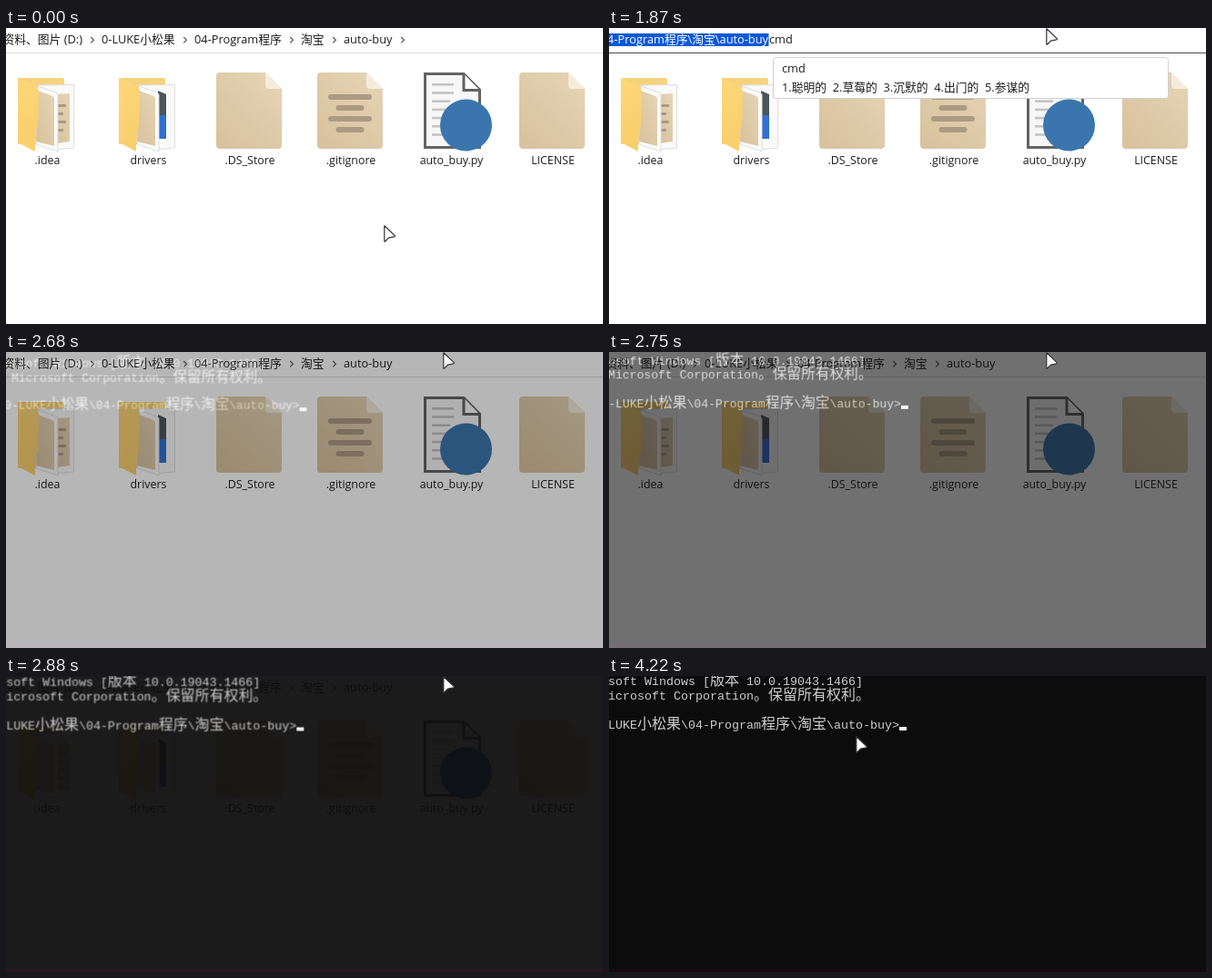
Animation, 656 px wide and 326 px high, one loop 4.75 s. Source, as an HTML page:

```html
<!DOCTYPE html>
<html lang="zh">
<head>
<meta charset="utf-8">
<title>Open a terminal from the address bar</title>
<style>
html, body { margin: 0; width: 100%; height: 100%; overflow: hidden; background: #fff; }
svg { display: block; width: 656px; height: 326px; }
text { font: 12.4px "Open Sans", "Noto Sans CJK SC", "Noto Sans CJK", sans-serif; fill: #1d1d1d; white-space: pre; }
.bar text { font-size: 12.8px; }
#path text { fill: #fff; }
#term text { font: 13.33px "Liberation Mono", "Noto Sans CJK SC", "Noto Sans CJK", monospace; fill: #ccc; }
#term .wide { font: 16px "Noto Sans CJK SC", "Noto Sans CJK", sans-serif; }
#term { transform-origin: 421px 205px; }
</style>
</head>
<body>
<svg viewBox="0 0 656 326">
  <defs>
    <linearGradient id="sand" x1="1" y1="0" x2="0.2" y2="1">
      <stop offset="0" stop-color="#e6d5b5"/><stop offset="1" stop-color="#d9c29f"/>
    </linearGradient>
    <linearGradient id="gold" x1="0" y1="0" x2="0.3" y2="1">
      <stop offset="0" stop-color="#ffd779"/><stop offset="1" stop-color="#f9cf6c"/>
    </linearGradient>
  </defs>
  <rect width="656" height="326" fill="#fff"/>
  <g id="files"></g>
  <rect y="27" width="656" height="1" fill="#d9d9d9"/>
  <rect id="focus" y="27" width="656" height="1" fill="#4b4b4b"/>
  <g id="crumbs" class="bar"></g>
  <g id="lastChevron"></g>
  <g id="path" class="bar">
    <rect y="6" width="175.5" height="14" fill="#0a58d6"/>
    <text x="175" y="17" text-anchor="end">04-Program程序\淘宝\auto-buy</text>
  </g>
  <g id="ime" class="bar"></g>
  <g id="term">
    <rect x="-100" y="-100" width="900" height="500" fill="#0c0c0c"/>
    <rect x="-100" y="323" width="900" height="80" fill="#1a0713"/>
    <rect id="caret" x="319" y="56" width="8" height="4" fill="#f2f2f2"/>
  </g>
  <path id="cursor" d="M.8.8V17.6Q.9 18.6 1.7 18L5.4 14.2 11.8 12.8Q12.9 12.4 12.2 11.6Z"
    fill="#fff" stroke="#333" stroke-width="1.2" stroke-linejoin="round"/>
</svg>
<script>
const LOOP = 4750;
const $ = id => document.getElementById(id);

function add(parent, tag, attrs, text) {
  const el = document.createElementNS('http://www.w3.org/2000/svg', tag);
  for (const k in attrs) el.setAttribute(k, attrs[k]);
  if (text) el.textContent = text;
  return parent.appendChild(el);
}
const shape = (g, d, fill, more) => add(g, 'path', { d, fill, ...more });
const line = (g, x, y, width, height, fill, rx = 0) => add(g, 'rect', { x, y, width, height, fill, rx });

// Icons, drawn relative to their own left edge
function folder(g, paintBack) {
  const edge = { stroke: '#dedede', 'stroke-width': 1 };
  shape(g, 'M1 55H49Q51 55 51 57V128H0V56Z', '#f6d27d');
  shape(g, 'M22 63L61.5 62.5V132L40 134Z', '#fafafa', edge);
  paintBack(g);
  shape(g, 'M22 64L42 71Q44 72 44 74V136L20 128Z', '#fbfbfb', edge);
  shape(g, 'M22 69L38 75Q40 76 40 78V130L20 125Z', 'url(#sand)');
  shape(g, 'M0 56Q0 54 2 55L21 66Q23 67 23 70L22 108 19 114V134Q19 137 17 135L0 126Z', 'url(#gold)');
}
function page(g) {
  shape(g, 'M4 49H54L72 67V129Q72 133 68 133H4Q0 133 0 129V53Q0 49 4 49Z', 'url(#sand)');
  shape(g, 'M54 49V63Q54 67 58 67H72Z', '#f5ecdc');
}
const icons = {
  idea: g => folder(g, g => {
    shape(g, 'M43 73L57 72V125L43 127Z', 'url(#sand)');
    for (const y of [84, 93, 102, 111]) line(g, 44, y, y % 2 ? 6 : 9, 3, '#ab9b83', 1);
  }),
  drivers: g => folder(g, g => {
    shape(g, 'M43 69L52 73V96H43Z', '#4b555b');
    line(g, 43, 96, 9, 26, '#2f6fd2');
  }),
  page,
  text: g => {
    page(g);
    for (let i = 0; i < 4; i++)
      line(g, i % 2 ? 20.5 : 12, 73 + 12 * i, i % 2 ? 31 : 48, 6, '#ab9b83', 3);
  },
  script: g => {
    const ink = { stroke: '#636363', 'stroke-width': 3 };
    shape(g, 'M1.5 50.5H44L61.5 68V131.5H1.5Z', '#f7f7f7', ink);
    shape(g, 'M44 50.5V68.5H61.5', '#fff', ink);
    for (let i = 0; i < 7; i++) line(g, 9, 61 + 9.2 * i, i < 2 ? 24 : 20, 2.6, '#c4c4c4');
    add(g, 'circle', { cx: 46.5, cy: 107, r: 28.5, fill: '#3a76ad' });
  }
};
[
  ['idea', 13, '.idea', 45.5], ['drivers', 124, 'drivers', 156.5],
  ['page', 231, '.DS_Store', 268], ['text', 342, '.gitignore', 379],
  ['script', 459, 'auto_buy.py', 489.5], ['page', 564, 'LICENSE', 601]
].forEach(([kind, x, label, mid]) => {
  icons[kind](add($('files'), 'g', { transform: `translate(${x})` }));
  add($('files'), 'text', { x: mid, y: 150, 'text-anchor': 'middle' }, label);
});

// Address bar
const chevron = (g, x) => shape(g, `M${x - 1.8} 10l3.2 3.2-3.2 3.2`, 'none', { stroke: '#555', 'stroke-width': 1.2 });
add($('crumbs'), 'text', { x: 84, y: 17, 'text-anchor': 'end' }, '资料、图片 (D:)');
[[105, '0-LUKE小松果'], [207, '04-Program程序'], [324, '淘宝'], [371, 'auto-buy']]
  .forEach(([x, name]) => add($('crumbs'), 'text', { x, y: 17 }, name));
[95, 197, 314, 361].forEach(x => chevron($('crumbs'), x));
chevron($('lastChevron'), 436);

// Input method popups, one for each typed letter
const popups = [
  ['c', 538, '1.从  2.出  3.才  4.次  5.错'],
  ['cm', 538, '1.草莓  2.聪明  3.沉默  4.参谋  5.出门'],
  ['cmd', 615, '1.聪明的  2.草莓的  3.沉默的  4.出门的  5.参谋的']
].map(([typed, right, words]) => {
  const g = add($('ime'), 'g', {});
  add(g, 'text', { x: 176, y: 17 }, typed);
  add(g, 'rect', { x: 180.5, y: 32.5, width: right - 181, height: 45, rx: 3, fill: '#fff', stroke: '#d0d0d0' });
  add(g, 'text', { x: 190, y: 49 }, typed);
  add(g, 'text', { x: 190, y: 70 }, words);
  return g;
});

// Console text on a grid of 8 px cells, wide characters take two
function print(x, y, text) {
  for (const run of text.match(/[\u3000-\u9fff]|[^\u3000-\u9fff]+/g)) {
    const wide = run >= '\u3000';
    add($('term'), 'text', { x, y, class: wide ? 'wide' : '' }, run);
    x += wide ? 16 : run.length * 8;
  }
}
print(-41, 10, 'Microsoft Windows [版本 10.0.19043.1466]');
print(-41, 26, '(c) Microsoft Corporation。保留所有权利。');
print(-17, 58, '0-LUKE小松果\\04-Program程序\\淘宝\\auto-buy>');

// Each row is a time in ms and the pose held from then on
function play(el, rows, pose) {
  const keys = rows.map(([t, ...v]) => ({ offset: t / LOOP, easing: 'step-end', ...pose(...v) }));
  keys.push({ ...keys[keys.length - 1], offset: 1 });
  el.animate(keys, { duration: LOOP, iterations: Infinity }).startTime = start;
}
const start = document.timeline.currentTime || 0;
const fade = (el, ...rows) => play(el, rows, opacity => ({ opacity }));

play($('cursor'), [
  [0, 415, 217], [260, 418, 208], [330, 430, 180], [400, 456, 130], [470, 492, 74],
  [530, 519, 34], [600, 528, 14], [670, 506, 5], [740, 480, 0],
  [2950, 463, 6], [3480, 442, 33], [3550, 392, 74], [3620, 318, 90], [3680, 265, 82], [3750, 271, 66]
], (x, y) => ({ transform: `translate(${x}px, ${y}px)` }));

fade($('focus'), [0, 0], [810, 0.5], [940, 1], [2480, 0]);
fade($('crumbs'), [0, 1], [870, 0], [2480, 0.6], [2610, 1]);
fade($('lastChevron'), [0, 1], [870, 0]);
fade($('path'), [0, 0], [870, 1], [2000, 0]);
fade(popups[0], [0, 0], [1470, 0.7], [1540, 1], [1670, 0]);
fade(popups[1], [0, 0], [1670, 1], [1870, 0]);
fade(popups[2], [0, 0], [1870, 1], [2000, 0.5], [2130, 0]);
fade($('caret'), [0, 1], [3680, 0], [4220, 1]);

play($('term'), [
  [0, 0, 0.96], [2680, 0.3, 0.965], [2750, 0.59, 0.981], [2820, 0.81, 0.992], [2880, 0.94, 0.997], [2950, 1, 1]
], (opacity, s) => ({ opacity, transform: `scale(${s})` }));
</script>
</body>
</html>
```
